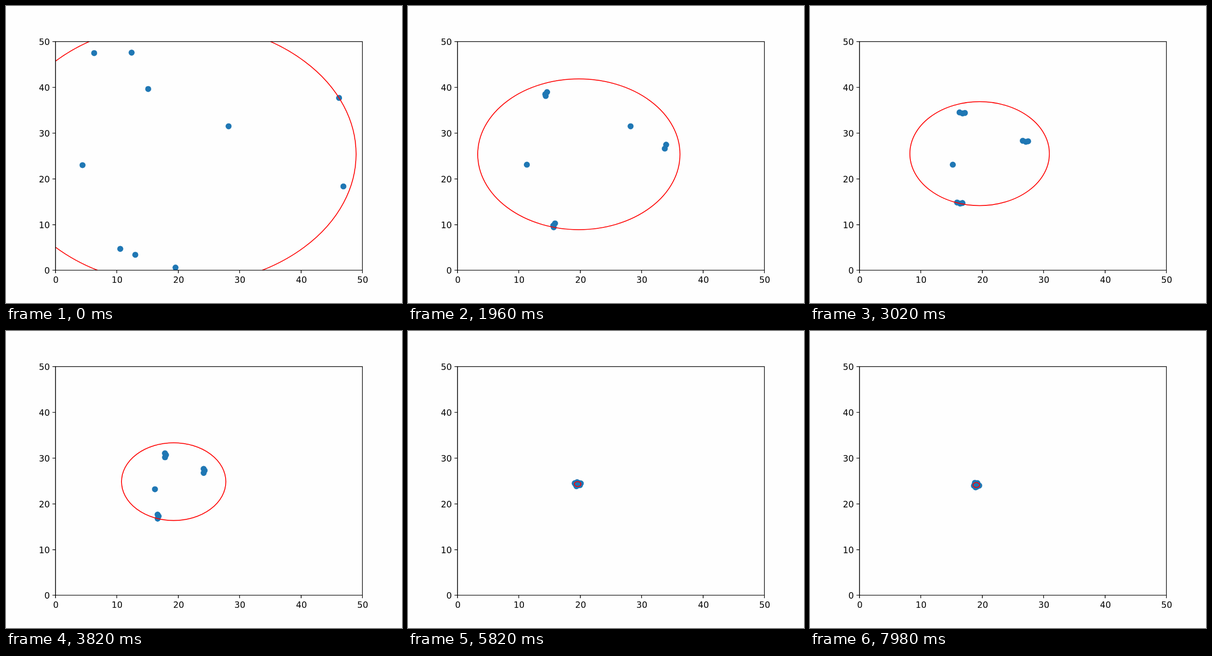
Animation of 864x648 px, one loop 8000 ms. Source, as an HTML page with a canvas:

```html
<!DOCTYPE html>
<html>
<head>
<meta charset="utf-8">
<style>
  html, body { margin: 0; width: 100%; height: 100%; overflow: hidden; background: #fefefe; }
  canvas { display: block; width: 864px; height: 648px; }
</style>
</head>
<body>
<canvas id="stage" width="1280" height="960"></canvas>
<script>
// The plot is laid out at 200 dots per inch and shown smaller.
const ctx = document.getElementById('stage').getContext('2d');
const LOOP = 8000;
const POINT = 200 / 72;
const UNIT_X = 19.84, UNIT_Y = 14.784;
const toX = v => 160 + v * UNIT_X;
const toY = v => 854.4 - v * UNIT_Y;
const LEFT = toX(0), RIGHT = toX(50), TOP = Math.round(toY(50)), BOTTOM = Math.round(toY(0));

// Each group first meets on its path, then follows it towards home.
const HOME = [19.6, 24.3], HOME_END = [19.05, 24.15];
const MEETINGS = [1960, 3020, 3820], GATHERED = 5820, RESTLESS = 5940, SHUFFLES = 5;
const groups = [
  { starts: [[6.3, 47.5], [12.4, 47.6], [15.1, 39.65]], path: [[14.3, 38.5], [16.8, 34.3], [18, 30.7]] },
  { starts: [[28.2, 31.5], [46.2, 37.7], [46.9, 18.35]], path: [[33.7, 27], [27.1, 28.1], [24.3, 27.3]] },
  { starts: [[4.4, 23]], path: [[11.3, 23.1], [15.2, 23.1], [16.2, 23.2]] },
  { starts: [[10.55, 4.7], [13, 3.4], [19.55, 0.6]], path: [[15.6, 9.8], [16.4, 14.6], [16.8, 17.3]] }
];

const mix = (a, b, u) => a.map((v, axis) => v + (b[axis] - v) * u);
const distance = (a, b) => Math.hypot(a[0] - b[0], a[1] - b[1]);

function spiral([x, y], i, count, turn) {
  const r = 0.55 * Math.sqrt(i / Math.max(1, count - 1));
  const angle = i * 2.4 + turn;
  return [x + r * Math.cos(angle), y + r * Math.sin(angle)];
}

function buildPoses() {
  const poses = [{ time: 0, points: groups.flatMap(g => g.starts) }];
  MEETINGS.forEach((time, k) => {
    const before = poses[k].points;
    let n = 0;
    const points = groups.flatMap(({ starts, path }) => starts.map((_, i) => {
      const now = before[n++];
      // A point ahead of its group waits for it.
      const waits = distance(now, HOME) < distance(path[k], HOME);
      return waits ? now : spiral(path[k], i, starts.length, k * 1.7 + 2.5);
    }));
    poses.push({ time, points });
  });
  const count = poses[0].points.length;
  const cluster = u => poses[0].points.map((_, i) => spiral(mix(HOME, HOME_END, u), i, count, u * 8));
  poses.push({ time: GATHERED, points: cluster(0) });
  for (let s = 0; s <= SHUFFLES; s++) {
    const u = s / SHUFFLES;
    poses.push({ time: RESTLESS + u * (LOOP - 20 - RESTLESS), points: cluster(u) });
  }
  return poses;
}
const poses = buildPoses();

// Points advance in jumps of about one unit, at staggered moments.
function pointsAt(t) {
  let k = 0;
  while (k < poses.length - 2 && t >= poses[k + 1].time) k++;
  const a = poses[k], b = poses[k + 1];
  const u = Math.min(1, (t - a.time) / (b.time - a.time));
  return a.points.map((from, i) => {
    const to = b.points[i];
    const steps = Math.max(1, Math.round(distance(from, to)));
    const phase = (i * 0.618 + 0.3) % 1;
    return mix(from, to, Math.min(1, Math.floor(u * steps + phase) / steps));
  });
}

function line(x1, y1, x2, y2) {
  ctx.beginPath();
  ctx.moveTo(x1, y1);
  ctx.lineTo(x2, y2);
  ctx.stroke();
}

function drawAxes() {
  const tick = 3.5 * POINT;
  ctx.strokeStyle = ctx.fillStyle = '#000';
  ctx.lineWidth = 0.8 * POINT;
  ctx.strokeRect(LEFT, TOP, RIGHT - LEFT, BOTTOM - TOP);
  ctx.font = `${10 * POINT}px "DejaVu Sans", sans-serif`;
  for (let value = 0; value <= 50; value += 10) {
    const x = Math.round(toX(value)), y = Math.round(toY(value));
    line(x, BOTTOM, x, BOTTOM + tick);
    line(LEFT, y, LEFT - tick, y);
    ctx.textAlign = 'center';
    ctx.fillText(value, x + 1, 895);
    ctx.textAlign = 'right';
    ctx.fillText(value, LEFT - 2 * tick + 1, y + 10.5);
  }
}

// Dots, and the circle around their centroid that reaches the farthest one.
function drawPoints(points) {
  const mean = axis => points.reduce((sum, p) => sum + p[axis], 0) / points.length;
  const center = [mean(0), mean(1)];
  const radius = Math.max(...points.map(p => distance(p, center)));

  ctx.save();
  ctx.beginPath();
  ctx.rect(LEFT, TOP, RIGHT - LEFT, BOTTOM - TOP);
  ctx.clip();
  ctx.fillStyle = '#1f77b4';
  for (const [x, y] of points) {
    ctx.beginPath();
    ctx.arc(toX(x), toY(y), 3.5 * POINT, 0, Math.PI * 2);
    ctx.fill();
  }
  ctx.strokeStyle = '#f00';
  ctx.lineWidth = POINT;
  ctx.beginPath();
  ctx.ellipse(toX(center[0]), toY(center[1]), radius * UNIT_X, radius * UNIT_Y, 0, 0, Math.PI * 2);
  ctx.stroke();
  ctx.restore();
}

function frame() {
  ctx.fillStyle = '#fefefe';
  ctx.fillRect(0, 0, 1280, 960);
  drawPoints(pointsAt(performance.now() % LOOP));
  drawAxes();
  requestAnimationFrame(frame);
}
frame();
</script>
</body>
</html>
```
